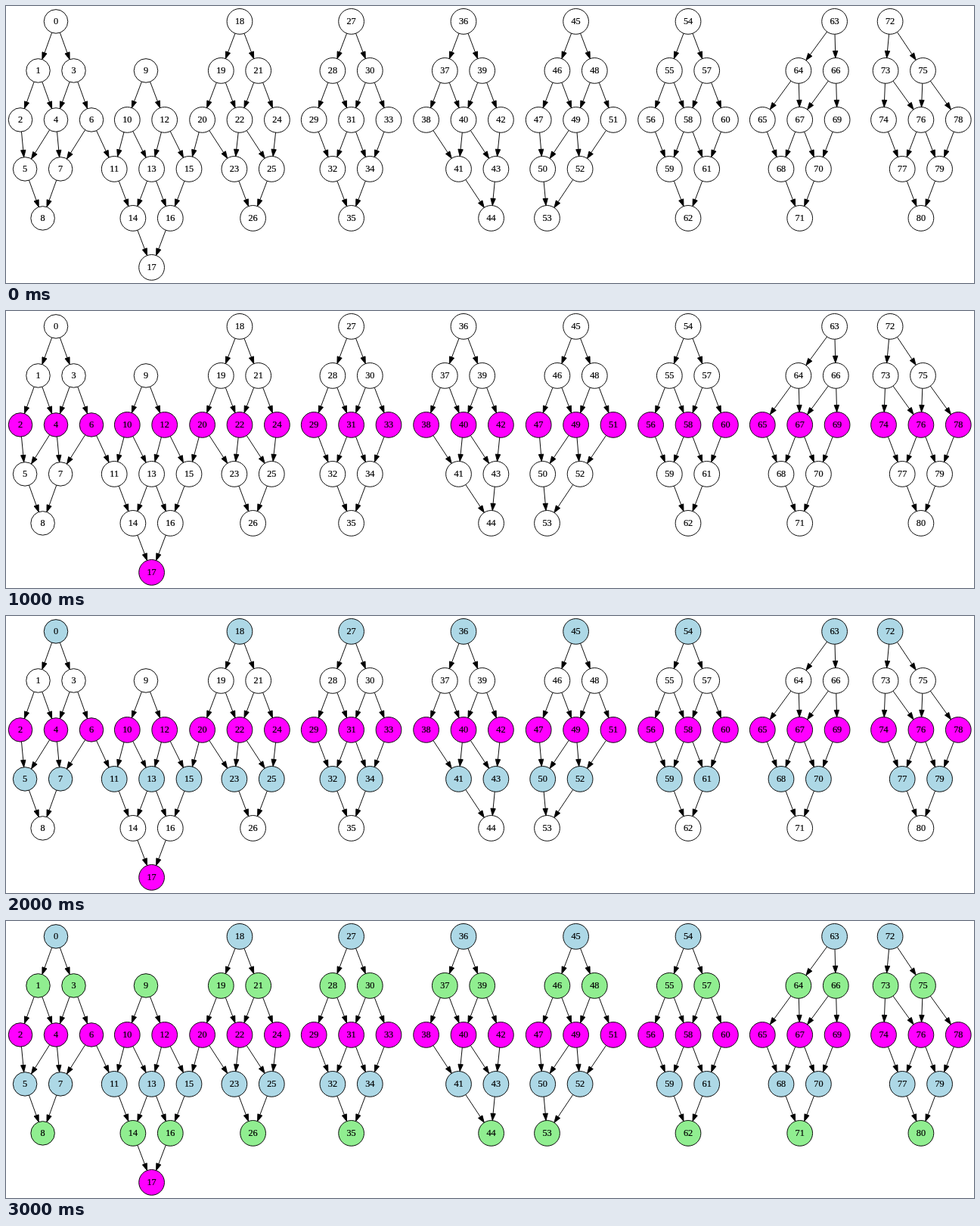
Recreate the animation shown at these times as an HTML page. Size 1280 px wide and 366 px high, loop 4000 ms.

```html
<!DOCTYPE html>
<html>
<head>
<meta charset="utf-8">
<style>
html, body { margin: 0; height: 100%; overflow: hidden; background: #fff; }
svg { display: block; }
circle, line, polygon { stroke: #000; stroke-width: .95; }
text { font: 12.26px "Liberation Serif", "Times New Roman", serif; text-anchor: middle; stroke: #000; stroke-width: .2; }
</style>
</head>
<body>
<svg width="1280" height="366" viewBox="0 0 1280 366"></svg>
<script>
const svg = document.querySelector('svg');

// Diamonds of 3x3 nodes: x of the top node, and how far each row's axis moves sideways.
const diamonds = [
  { x: 66, bend: { 3: -17.4 } },
  { x: 185, bend: { 2: 7.6 } },
  { x: 309, bend: { 3: 17.6 } },
  { x: 456.6 },
  { x: 605, bend: { 3: 18.2, 4: 18.4 } },
  { x: 753.6, bend: { 3: -19.2, 4: -18.9 } },
  { x: 902 },
  { x: 1095.6, bend: { 1: -23, 2: -22.9 } },
  { x: 1169.1, bend: { 1: 18.7, 2: 22.1 } }
];

const nodes = [], edges = [[6, 11], [20, 15]];
diamonds.forEach(({ x, bend = {} }, d) => {
  const gap = d ? 24.7 : 23.5;
  for (let k = 0; k < 9; k++) {
    const i = nodes.length;
    const left = k % 3, right = Math.floor(k / 3), depth = left + right;
    let axis = x;
    for (let j = 1; j <= depth; j++) axis += bend[j] || 0;
    const row = depth + (d === 1 ? 1 : 0);
    nodes.push({ x: axis + gap * (right - left), y: 20.4 + 65 * row, row, r: i < 10 ? 15.77 : 16.87 });
    if (left < 2) edges.push([i, i + 1]);
    if (right < 2) edges.push([i, i + 3]);
  }
});

function add(tag, attrs, text = '') {
  const el = document.createElementNS('http://www.w3.org/2000/svg', tag);
  for (const name in attrs) el.setAttribute(name, attrs[name]);
  el.textContent = text;
  svg.append(el);
  return el;
}

const circles = nodes.map((n, i) => {
  const circle = add('circle', { cx: n.x, cy: n.y, r: n.r, fill: '#fff' });
  add('text', { x: n.x, y: n.y + 3.5 }, i);
  return circle;
});

for (const [from, to] of edges) {
  const a = nodes[from], b = nodes[to];
  const dx = b.x - a.x, dy = b.y - a.y, len = Math.hypot(dx, dy);
  const ux = dx / len, uy = dy / len;
  const at = (d, side = 0) => [a.x + ux * d - uy * side, a.y + uy * d + ux * side];
  const tip = len - b.r, base = tip - 9.2;
  const [x1, y1] = at(a.r), [x2, y2] = at(base);
  add('line', { x1, y1, x2, y2 });
  add('polygon', { points: [at(tip), at(base, 3.2), at(base, -3.2)].join(' ') });
}

// Colour of each row (mod 3) and the second at which it appears.
const colors = ['lightblue', 'lightgreen', '#f0f'];
const starts = [2, 3, 1];
let shown = -1;

function draw(now) {
  const step = Math.floor(now / 1000) % 4;
  if (step !== shown) {
    shown = step;
    circles.forEach((circle, i) => {
      const c = nodes[i].row % 3;
      circle.setAttribute('fill', step >= starts[c] ? colors[c] : '#fff');
    });
  }
  requestAnimationFrame(draw);
}
draw(performance.now());
</script>
</body>
</html>
```
